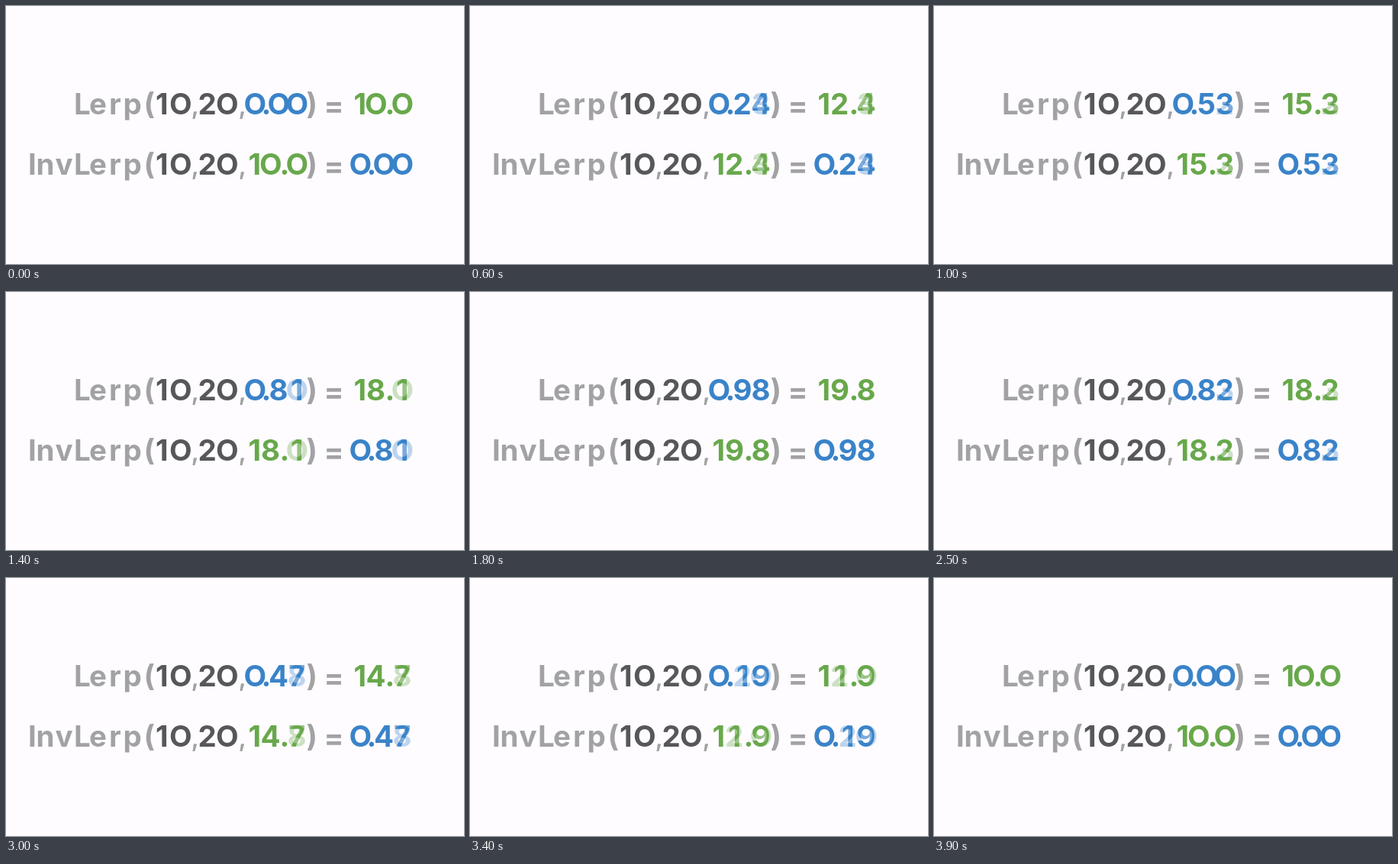
These frames come from a looping animation (600x338 px, 4000 ms). An HTML page with a canvas:

```html
<!DOCTYPE html>
<html lang="en">
<head>
<meta charset="utf-8">
<title>Lerp and InvLerp</title>
<style>
  html, body { margin: 0; width: 100%; height: 100%; overflow: hidden; background: #fefcff; }
  canvas { display: block; width: 600px; height: 338px; }
</style>
</head>
<body>
<canvas id="stage" width="600" height="338" role="img"
  aria-label="Lerp(10,20,t) = value and InvLerp(10,20,value) = t"></canvas>
<script>
const ctx = document.getElementById('stage').getContext('2d');
const LOOP = 4000, STEP = 100;
const SHIFT = 40, LAG = 1000 / 60, MIX = 0.33;
const GREY = '#a2a2a4', DARK = '#57575b', BLUE = '#3a83c9', GREEN = '#68a84b';
const TOP = 142, LOW = 221;
const BLUE_SLOTS = [13, 28, 44, 68];
const GREEN_SLOTS = [6.5, 27.5, 46, 62];
const BOLD = '750 38.5px Inter, sans-serif';
const SMALL = '600 33px Inter, sans-serif';

// Draws one character with its ink centred on x; zeros are fully round.
function put(char, x, y, color) {
  const glyph = char === '0' ? 'O' : char;
  const m = ctx.measureText(glyph);
  ctx.fillStyle = color;
  ctx.fillText(glyph, x - (m.actualBoundingBoxRight - m.actualBoundingBoxLeft) / 2, y);
}

function word(text, centres, y, color, font = BOLD) {
  ctx.font = font;
  [...text].forEach((char, i) => put(char, centres[i], y, color));
}

// Crossfades the characters that differ and draws the rest solid.
function number(now, before, left, slots, y, color) {
  const changed = [...now].map((char, i) => char !== before[i]);
  ctx.font = BOLD;
  ctx.globalCompositeOperation = 'lighter';
  changed.forEach((differs, i) => {
    if (!differs) return;
    ctx.globalAlpha = 1 - MIX;
    put(now[i], left + slots[i], y, color);
    ctx.globalAlpha = MIX;
    put(before[i], left + slots[i], y, color);
  });
  ctx.globalCompositeOperation = 'source-over';
  ctx.globalAlpha = 1;
  changed.forEach((differs, i) => {
    if (!differs) put(now[i], left + slots[i], y, color);
  });
}

function shared(y) {
  word('Lerp()', [100.5, 120.5, 143.5, 166, 189, 400], y, GREY);
  word('10', [204, 228.5], y, DARK);
  word('20', [264, 289.5], y, DARK);
  word(',,', [247, 309], y, GREY, SMALL);
  word('=', [429.5], y + 1.5, GREY);
}

// Smoothstep up in the first half of the loop, down in the second.
function wave(ms) {
  const x = 1 - Math.abs(1 - ms / (LOOP / 2));
  return x * x * (3 - 2 * x);
}

function draw(time) {
  const t = Math.floor(time % LOOP / STEP) * STEP + SHIFT;
  const [now, before] = [t, t - LAG].map(ms => {
    const n = Math.round(100 * wave(ms));
    return { ratio: (n / 100).toFixed(2), value: (10 + n / 10).toFixed(1) };
  });
  const ratio = (left, y) => number(now.ratio, before.ratio, left, BLUE_SLOTS, y, BLUE);
  const value = (left, y) => number(now.value, before.value, left, GREEN_SLOTS, y, GREEN);

  ctx.clearRect(0, 0, 600, 338);
  ratio(313, TOP);
  value(457, TOP);
  value(319, LOW);
  ratio(451, LOW);
  shared(TOP);
  shared(LOW);
  word('Inv', [34.5, 51.5, 76], LOW, GREY);
}

const start = performance.now();
function tick() {
  draw(performance.now() - start);
  requestAnimationFrame(tick);
}
tick();
</script>
</body>
</html>
```
